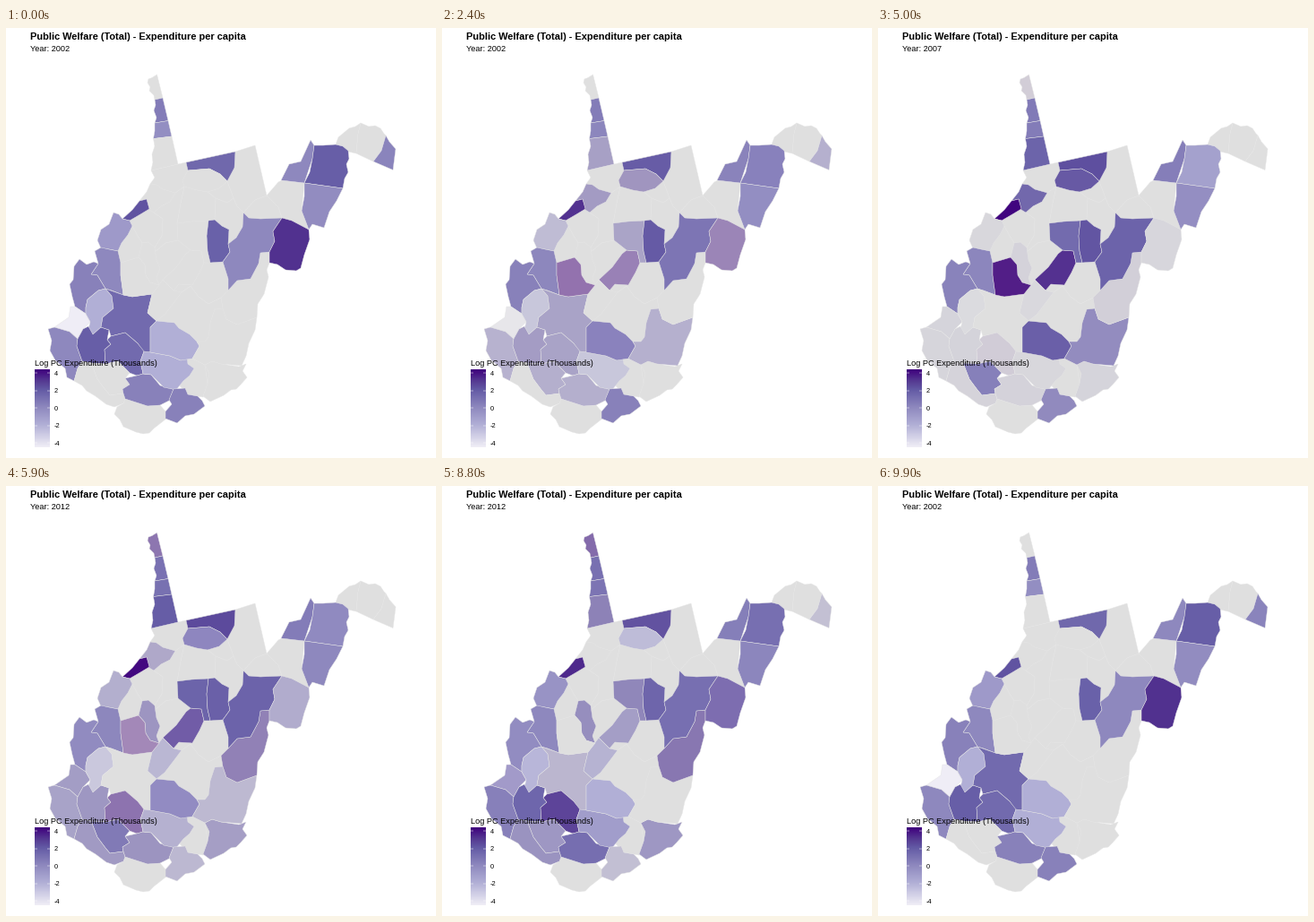
Write a matplotlib script that moves like this. It is 480 px wide and 480 px high and loops after 10 s.

```python
import numpy as np
import matplotlib.pyplot as plt
from matplotlib.animation import FuncAnimation
from matplotlib.colors import LinearSegmentedColormap, to_rgb

SIZE, DPI = 480, 100
GREY = np.array(to_rgb("#dfdfdf"))
LOW, HIGH = -4.55, 4.3
PX = 72 / DPI
plt.rcParams["font.family"] = "Liberation Sans"

stops = [(-4.55, "#f0eef6"), (-2, "#b1afd6"), (0, "#8e88be"),
         (2, "#635aa5"), (3, "#553a92"), (4.3, "#3f007d")]
purples = LinearSegmentedColormap.from_list(
    "purples", [((v - LOW) / (HIGH - LOW), c) for v, c in stops], N=512)

# CIE Lab conversion, used for blending fills between years
TO_XYZ = np.array([[.4124, .3576, .1805], [.2126, .7152, .0722], [.0193, .1192, .9505]])
WHITE = TO_XYZ.sum(axis=1)


def to_lab(rgb):
    rgb = np.asarray(rgb)
    linear = np.where(rgb > .04045, ((rgb + .055) / 1.055) ** 2.4, rgb / 12.92)
    xyz = TO_XYZ @ linear / WHITE
    f = np.where(xyz > .008856, np.cbrt(xyz), 7.787 * xyz + 16 / 116)
    return np.array([116 * f[1] - 16, 500 * (f[0] - f[1]), 200 * (f[1] - f[2])])


def to_srgb(lab):
    fy = (lab[0] + 16) / 116
    f = np.array([fy + lab[1] / 500, fy, fy - lab[2] / 200])
    xyz = np.where(f > .2069, f ** 3, (f - 16 / 116) / 7.787) * WHITE
    linear = np.clip(np.linalg.solve(TO_XYZ, xyz), 0, 1)
    return np.clip(np.where(linear > .0031308, 1.055 * linear ** (1 / 2.4) - .055,
                            12.92 * linear), 0, 1)


def fill_lab(value):
    if value is None:
        return to_lab(GREY)
    return to_lab(purples((value - LOW) / (HIGH - LOW))[:3])


fig = plt.figure(figsize=(SIZE / DPI, SIZE / DPI), dpi=DPI, facecolor="white")
ax = fig.add_axes([0, 0, 1, 1])
ax.axis("off")
counties = []
NA = None
BORDER = "#e6e6e6"


def area(*points):
    """Plain grey land without data."""
    ax.fill(*zip(*points), fc=GREY, ec=BORDER, lw=.3, zorder=1)


def border(*points):
    ax.plot(*zip(*points), color=BORDER, lw=.45, zorder=1.5)


def county(values, *points):
    """Land with one value per survey year."""
    patch = ax.fill(*zip(*points), fc=GREY, ec=BORDER, lw=.32, joinstyle="round", zorder=2)[0]
    counties.append((patch, [fill_lab(v) for v in values]))


# Interior and the counties that never report
area((162, 159), (192, 152), (201, 150), (256, 138), (278, 131), (291, 187), (304, 172),
     (308, 170), (333, 173), (330, 203), (338, 225), (308, 213), (293, 251), (274, 318),
     (255, 365), (226, 396), (220, 412), (203, 409), (180, 385), (156, 350), (125, 345),
     (111, 288), (123, 250), (131, 214), (142, 212), (158, 198), (163, 176), (161, 174),
     (166, 167))
area((121, 431), (124, 423), (131, 419), (133, 414), (158, 422), (172, 421), (178, 428),
     (179, 436), (165, 447), (160, 452), (153, 453), (145, 451), (131, 445), (127, 437))
area((368, 130), (371, 122), (383, 112), (390, 110), (396, 106), (393, 118), (391, 140),
     (382, 138), (376, 132))
area((396, 106), (405, 110), (412, 109), (418, 112), (422, 118), (424, 120), (419, 137),
     (410, 149), (391, 140), (393, 118))

border((189, 184), (199, 177), (195, 196), (191, 218))
border((165, 206), (175, 213), (174, 232), (166, 245))
border((141, 221), (147, 232), (152, 240))
border((166, 250), (178, 240), (192, 237))
border((226, 215), (233, 214), (234, 190), (225, 183))
border((234, 190), (247, 195), (254, 190), (247, 171))
border((254, 190), (258, 199), (265, 206), (278, 192), (291, 187), (304, 200), (308, 212))
border((196, 295), (206, 288), (215, 300), (226, 308), (240, 301))
border((208, 369), (222, 376), (225, 397), (220, 412))

# Northern panhandle and the Ohio river
county((NA, NA, 3.1), (168.5, 52), (163, 55.5), (159, 57), (158, 61), (161, 66), (160, 70),
       (165, 75), (166, 80), (175, 78))
county((.5, .5, 1.3), (166, 80), (175, 78), (181, 103.5), (166, 106), (168, 100),
       (165, 92), (167, 86))
county((-.3, .4, 1.4), (166, 106), (181, 103.5), (185, 121), (164.5, 123.5), (166, 115))
county((NA, 1.5, 2.1), (164.5, 123.5), (185, 121), (192, 152), (162, 159), (164, 150),
       (163, 141), (166, 132))
county((NA, 1.9, NA), (149, 193), (157, 183), (161, 174), (168, 175), (175, 180),
       (189, 184), (183, 194), (173, 199), (165, 206), (160, 203), (157, 191))
county((2.2, 4.2, 4), (130, 213), (141, 203), (149, 193), (157, 191), (160, 202),
       (150, 208), (138, 215))
county((-.9, NA, -.4), (120, 206), (126, 208), (130, 213), (138, 215), (141, 221),
       (136, 231), (129, 240), (125, 249), (115, 247), (106, 246), (102, 237), (106, 225),
       (115, 219))
county((0, .1, 0), (99, 249), (106, 245), (115, 247), (125, 249), (128, 262), (128, 276),
       (131, 298), (118, 293), (111, 291), (102, 276), (95, 275), (103, 263))
county((.3, .3, -.5), (82, 258), (90, 264), (98, 261), (103, 263), (95, 275), (102, 276),
       (111, 291), (103, 293), (91, 303), (89, 312), (89, 319), (77, 311), (74, 300),
       (71, 286), (75, 281), (76, 266))
county((-4.5, NA, .9), (54, 334), (70, 323), (72, 311), (77, 311), (89, 319), (94, 328),
       (86, 336), (80, 347), (71, 339))
county((0, NA, .5), (47, 336), (54, 334), (71, 339), (80, 347), (79, 355), (85, 372),
       (80, 380), (76, 394), (68, 390), (66, 380), (55, 371), (49, 360), (51, 349))

# South-west
county((-2, NA, -2.4), (91, 303), (103, 293), (111, 291), (118, 299), (120, 313),
       (108, 323), (106, 334), (97, 342), (92, 336), (94, 328), (89, 319), (89, 312))
county((1.8, NA, 1.3), (92, 333), (97, 342), (106, 334), (115, 337), (113, 348),
       (117, 353), (110, 359), (111, 375), (95, 374), (85, 372), (79, 355), (80, 347),
       (86, 336))
county((1.3, NA, NA), (111, 291), (131, 298), (141, 300), (163, 297), (158, 318),
       (168, 327), (161, 334), (161, 362), (153, 362), (147, 352), (133, 340), (117, 344),
       (115, 337), (106, 334), (108, 323), (120, 313), (118, 299))
county((1.3, NA, 3.2), (117, 344), (133, 340), (147, 352), (154, 361), (150, 372),
       (153, 386), (146, 388), (138, 385), (133, 380), (125, 372), (111, 375), (110, 359),
       (117, 353), (113, 348))
county((NA, .3, .8), (95, 374), (111, 375), (125, 372), (133, 380), (138, 385), (133, 391),
       (138, 398), (130, 403), (131, 408), (116, 410), (111, 404), (102, 392))
county((NA, NA, 1.1), (76, 394), (80, 380), (85, 372), (95, 374), (102, 392), (111, 404),
       (116, 410), (131, 408), (133, 414), (131, 419), (121, 423), (112, 420), (100, 411),
       (90, 405), (85, 399))
county((.3, NA, 1.5), (131, 408), (130, 403), (138, 398), (133, 391), (146, 388),
       (153, 386), (162, 387), (172, 399), (187, 403), (182, 416), (172, 421), (158, 422),
       (133, 414))
county((-2, NA, -.6), (153, 386), (150, 372), (154, 361), (162, 362), (183, 366),
       (195, 371), (202, 367), (203, 375), (210, 380), (205, 388), (198, 394), (190, 404),
       (176, 401), (162, 387))
county((-2, 2.1, -2), (161, 334), (168, 327), (188, 329), (193, 335), (205, 342),
       (213, 350), (216, 355), (208, 369), (195, 371), (183, 366), (161, 362))
county((.3, .3, NA), (178, 428), (185, 420), (182, 415), (187, 403), (200, 402), (203, 409),
       (214, 411), (219, 416), (222, 422), (210, 431), (200, 433), (191, 441), (178, 436))
county((NA, NA, .8), (230, 372), (240, 375), (260, 378), (268, 375), (264, 383), (269, 390),
       (262, 398), (257, 403), (251, 404), (243, 410), (228, 417), (220, 411), (225, 397),
       (227, 386), (222, 376))

# Centre
county((NA, .2, NA), (213, 350), (222, 350), (226, 345), (228, 329), (233, 314), (242, 313),
       (246, 325), (258, 331), (280, 323), (278, 337), (271, 352), (268, 366), (263, 377),
       (240, 375), (230, 372), (222, 376), (208, 369), (216, 355))
county((NA, NA, 2.6), (294, 250), (294, 262), (291, 270), (293, 278), (288, 297),
       (281, 308), (280, 323), (258, 331), (246, 325), (242, 313), (240, 301), (248, 293),
       (258, 282), (273, 280), (282, 263), (284, 251))
county((NA, 3.4, .4), (175, 281), (190, 267), (201, 252), (206, 248), (218, 249),
       (221, 262), (216, 273), (208, 287), (193, 286), (187, 293))
county((NA, NA, -1.1), (158, 318), (163, 297), (175, 281), (187, 293), (196, 295),
       (187, 307), (177, 320), (168, 327))
county((NA, NA, 1.4), (148, 256), (152, 240), (159, 239), (166, 245), (168, 259), (172, 268),
       (168, 279), (171, 287), (161, 284), (156, 276), (155, 264))
county((NA, 4.3, NA), (128, 262), (148, 256), (155, 264), (156, 276), (161, 284),
       (171, 287), (163, 297), (141, 300), (131, 298), (128, 276))
county((NA, 1.2, 1.8), (191, 218), (207, 216), (226, 215), (224, 232), (225, 249),
       (228, 262), (221, 262), (218, 249), (206, 248), (192, 237))
county((1.7, 2.2, 1.4), (226, 215), (233, 214), (241, 221), (249, 225), (248, 241),
       (250, 250), (242, 261), (228, 262), (225, 249), (224, 232))
county((0, 1.6, 1.6), (265, 206), (271, 212), (284, 213), (308, 212), (298, 227),
       (300, 238), (294, 250), (284, 251), (282, 263), (273, 280), (258, 282), (248, 293),
       (248, 280), (242, 261), (250, 250), (248, 241), (257, 234), (264, 222))

# North and east
county((1.4, 2.3, 2.6), (201, 150), (256, 138), (255, 156), (247, 171), (239, 163),
       (227, 157), (203, 159))
county((NA, 2.3, -1.8), (203, 159), (227, 157), (239, 163), (247, 171), (238, 179),
       (225, 183), (213, 181), (199, 177), (197, 170))
county((3.2, NA, -.2), (308, 212), (319, 215), (338, 225), (339, 236), (333, 253),
       (329, 268), (324, 271), (312, 270), (303, 264), (294, 262), (294, 250), (300, 238),
       (298, 227))
county((0, .4, .6), (307, 170), (316, 152), (329, 149), (340, 125), (344, 131), (342, 146),
       (333, 173))
county((1.8, -1.5, .7), (344, 131), (354, 131), (368, 130), (376, 132), (382, 137),
       (383, 146), (380, 152), (382, 161), (378, 168), (376, 179), (333, 173), (339, 161),
       (342, 146))
county((-.2, -.4, .2), (333, 173), (376, 179), (369, 193), (361, 205), (355, 223),
       (342, 219), (338, 225), (330, 204), (333, 188))
county((.2, NA, NA), (424, 120), (428, 127), (435, 135), (432, 158.5), (410, 149),
       (419, 137))


def label(x, baseline, text, size, **style):
    return ax.text(x, baseline, text, size=size * PX, color="black", va="baseline",
                   zorder=6, **style)


label(27, 13, "Public Welfare (Total) - Expenditure per capita", 10.95, weight="bold")
year_text = label(27, 26, "", 9.17)
label(31.5, 377, "Log PC Expenditure (Thousands)", 9.13)

ax.imshow(np.linspace(1, 0, 256)[:, None], cmap=purples, aspect="auto", zorder=4,
          extent=(32, 49, 468.5, 382))
for value in range(4, -5, -2):
    y = 424 - value * 9.75
    for x in (32, 45.6):
        ax.plot((x, x + 3.4), (y, y), color="white", lw=.35, zorder=5, solid_capstyle="butt")
    label(53.7, y + 2.7, str(value), 7.33)
ax.set(xlim=(0, SIZE), ylim=(SIZE, 0))

YEARS = (2002, 2007, 2012)
# Moments, in tenths of a second, at which each transition takes a step
STEPS = ((17, 18, 20, 22, 24, 26, 28, 30, 32, 33),
         (50, 52, 54, 55, 57, 59, 61, 63, 65, 66),
         (84, 86, 88, 90, 92, 94, 95, 97, 99))


def progress(tick):
    """Year index to leave and the share of the way to the next one."""
    for i in (2, 1, 0):
        done = sum(step <= tick for step in STEPS[i])
        if done or i == 0:
            return i, done / len(STEPS[i])


def update(tick):
    i, share = progress(tick)
    j = (i + 1) % 3
    for patch, labs in counties:
        patch.set_facecolor(to_srgb(labs[i] + (labs[j] - labs[i]) * share))
    year_text.set_text(f"Year: {YEARS[j if share > .5 else i]}")
    return [year_text] + [patch for patch, _ in counties]


anim = FuncAnimation(fig, update, frames=100, interval=100, repeat=True, repeat_delay=0)
plt.show()
```
